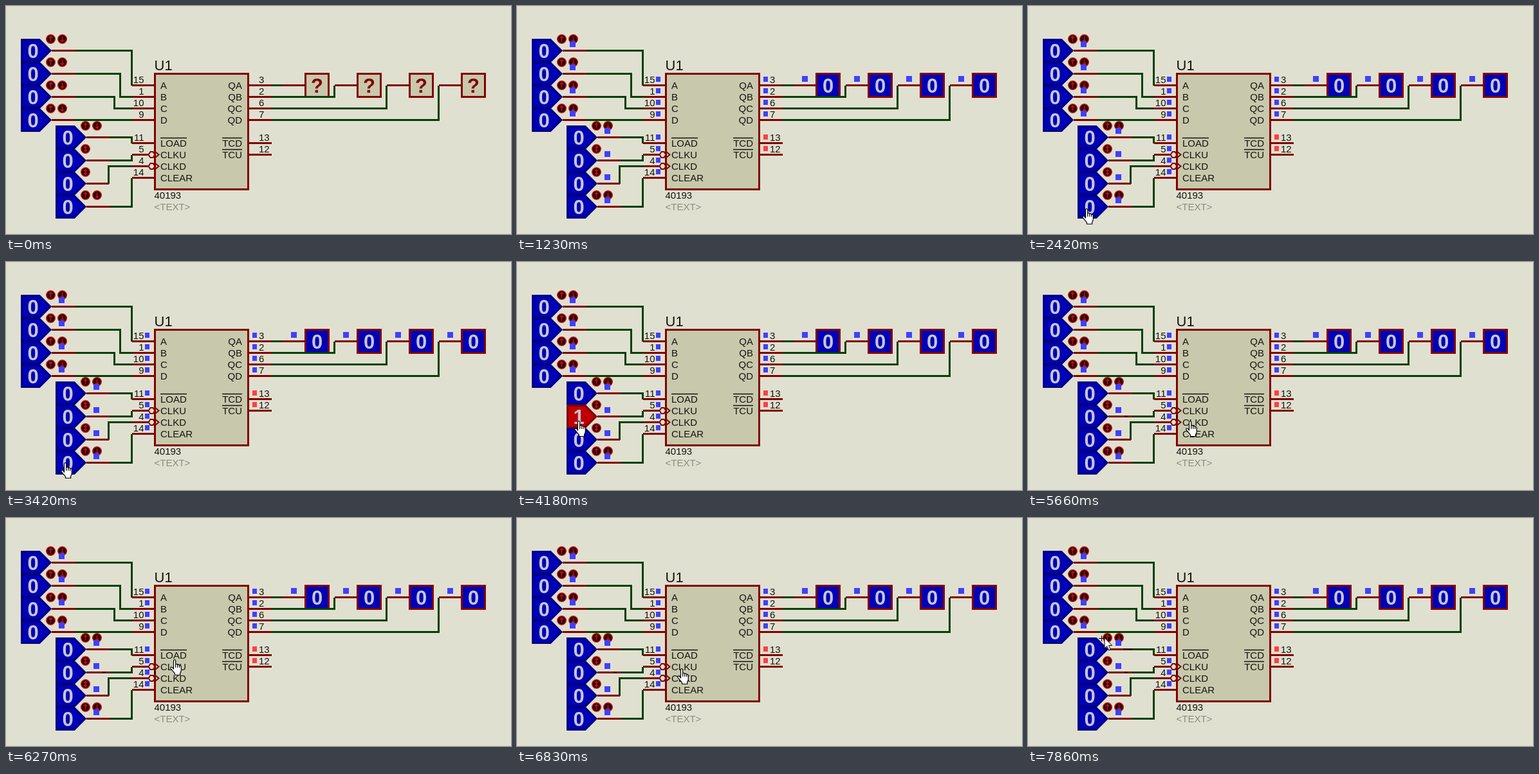
Write an HTML page that moves like this. It is 785 px wide and 355 px high and loops after 8000 ms.

```html
<!DOCTYPE html>
<html lang="en">
<head>
<meta charset="utf-8">
<title>Counter simulation</title>
<style>
  html, body { margin: 0; width: 100%; height: 100%; overflow: hidden; background: #e0e0d0; }
  svg { display: block; width: 785px; height: 355px; }
  text { font: 15px "Liberation Sans", Arial, sans-serif; fill: #141410; }
  .digit { font-size: 31px; font-weight: bold; text-anchor: middle; fill: #c6c6d0; }
  .unknown { fill: #800000; }
  .end { text-anchor: end; }
  .line { fill: none; stroke-width: 3; shape-rendering: crispEdges; }
  .wire { stroke: #004000; }
  .pin { stroke: #800000; }
</style>
</head>
<body>
<svg id="stage" viewBox="0 0 785 355">
  <g id="board"></g>
  <g id="cursor" visibility="hidden">
    <path id="hand" fill="#fff" stroke="#000" stroke-width="1.2" stroke-linejoin="round"
      d="M5.5 15V2.5Q5.5 .6 7 .6Q8.7 .6 8.7 2.5V8.5Q9 7.4 10.2 7.4Q11.6 7.4 11.8 9Q12.2 8.2 13.3 8.3Q14.6 8.4 14.7 10Q15.2 9.3 16.1 9.5Q17.3 9.8 17.3 11.5V17Q17.2 19.5 15.6 21.5V24.5H7.5V22.2L1.1 14.4Q.3 12.9 1.5 12.2Q2.6 11.6 3.8 12.9ZM8.7 8.5V13M11.8 9V13M14.7 10V13"/>
    <g id="arrow">
      <path stroke="#000" d="M0 4.5H8M4.5 0V9"/>
      <path fill="#fff" stroke="#000" d="M9 3.5V20L12.8 16.4L15.6 23L18.3 21.8L15.5 15.4H20.7Z"/>
    </g>
  </g>
</svg>
<script>
const LOOP = 8000, POWER_ON = 1230;
const LOW = "#4040ff", HIGH = "#ff4040";
const board = document.getElementById("board");

function add(tag, attrs, text) {
  const el = document.createElementNS("http://www.w3.org/2000/svg", tag);
  for (const key in attrs) el.setAttribute(key, attrs[key]);
  if (text) el.textContent = text;
  return board.appendChild(el);
}
const line = (kind, d) => add("path", { class: "line " + kind, d, transform: "translate(.5 .5)" });
const label = (x, y, text, cls = "") => add("text", { x, y, class: cls }, text);
const show = (el, on) => el.setAttribute("visibility", on ? "visible" : "hidden");

const lights = [];
function light(x, y, w, h, fill = LOW) {
  const el = add("rect", { x, y, width: w, height: h, fill });
  lights.push(el);
  return el;
}

function button(x, y, kind) {
  const head = { up: "M-2.5 -1.5L0 -4L2.5 -1.5", down: "M-2.5 1.5L0 4L2.5 1.5" };
  const heads = kind === "both" ? head.up + head.down : head[kind];
  const at = `translate(${x + .5} ${y + .5})`;
  add("circle", { r: 6.8, fill: "#300404", stroke: "#c81414", "stroke-width": 1.4, transform: at });
  add("path", { d: "M0 -4V4" + heads, fill: "none", stroke: "#c01818", "stroke-width": 1.3, transform: at });
}

// Chip body
add("rect", { x: 231.5, y: 105.5, width: 145, height: 180, fill: "#c8c8ac", stroke: "#800000", "stroke-width": 3 });
label(230.5, 100, "U1").style.fontSize = "22px";
label(230.5, 300, "40193");
label(230.5, 318, "<TEXT>").style.fill = "#8c8c82";

// name, pin number, tip x, tip y, chip pin y, bend x, kind of buttons
const INPUTS = [
  ["A", 15, 71, 69, 123, 195],
  ["B", 1, 71, 105, 141, 177],
  ["C", 10, 71, 141, 159, 168],
  ["D", 9, 71, 177, 177, 195],
  ["LOAD", 11, 125, 204, 213, 195],
  ["CLKU", 5, 125, 240, 231, 195, "both"],
  ["CLKD", 4, 125, 276, 249, 159, "both"],
  ["CLEAR", 14, 125, 312, 267, 195]
];
const inputs = {};
INPUTS.forEach(([name, number, x, y, py, bend, kind]) => {
  const joint = Math.min(x + 36, bend);
  line("wire", `M${joint} ${y}H${bend}V${py}H195`);
  line("pin", `M${x - 1} ${y}H${joint}`);
  const clock = kind === "both";
  line("pin", `M195 ${py}H${clock ? 221 : 231}`);
  if (clock) {
    add("path", {
      d: `M221 ${py}L224 ${py - 4.5}H228L231 ${py}L228 ${py + 4.5}H224ZM231 ${py - 5}L237 ${py}L231 ${py + 5}`,
      fill: "none", stroke: "#800000", "stroke-width": 2, transform: "translate(.5 .5)"
    });
  }
  const body = add("path", {
    d: `M${x - 46.5} ${y - 16.5}H${x - 19}L${x - 2} ${y + .5}L${x - 19} ${y + 17.5}H${x - 46.5}Z`,
    "stroke-width": 3
  });
  const digit = label(x - 29, y + 11.5, "0", "digit");
  if (clock) button(x - 2, y - 18, "both");
  else {
    button(x - 2, y - 18, "up");
    button(x + 16, y - 18, "down");
  }
  label(240, py + 6, name);
  label(214.5, py - 3, String(number), "end");
  inputs[name] = {
    body, digit,
    lights: [light(x + 11, y - 14, 9, 9), light(216, py - 13, 7, 8)]
  };
});

// name, pin number, pin y, bend x
const probes = [];
[["QA", 3, 123, 428], ["QB", 2, 141, 510], ["QC", 6, 159, 591], ["QD", 7, 177, 672]]
  .forEach(([name, number, y, bend], i) => {
    const left = 465 + 81 * i;
    line("wire", `M412 ${y}H${bend}V123`);
    line("pin", `M376 ${y}H412M${bend} 123H${left}`);
    const box = add("rect", { x: left + .5, y: 105.5, width: 36, height: 36, stroke: "#800000", "stroke-width": 3 });
    probes.push({ box, digit: label(left + 18.5, 134.5, "?", "digit") });
    label(367, y + 6, name, "end");
    label(393, y - 3, String(number));
    light(383, y - 13, 7, 8);
    light(443 + 81 * i, 109, 9, 9);
  });
[["TCD", 13, 213], ["TCU", 12, 231]].forEach(([name, number, y]) => {
  line("pin", `M376 ${y}H412`);
  label(367, y + 6, name, "end");
  label(393, y - 3, String(number));
  light(383, y - 13, 7, 8, HIGH);
});
add("path", {
  d: "M240 205.5H281M336 205.5H367M336 223.5H367", stroke: "#141410", "stroke-width": 1.5
});

// Dark traces left behind by the pointer
const traces = [[5430, "M150 240.5H155"], [5658, "M231.5 238V244"], [7860, "M148 204.5H162"]]
  .map(([from, d]) => ({ from, el: add("path", { d, stroke: "#180808", "stroke-width": 2 }) }));

const PULSES = [["CLEAR", 2570, 2950], ["CLKU", 4180, 4420]];
const LAG = 80;

// start, end, steps, x, y: each move goes on from the previous place
const MOVES = [
  [1700, 2100, 6, 89, 323],
  [2250, 2420, 3, 84, 315],
  [2570, 2720, 3, 84, 313],
  [3420, 3420, 1, 85, 312],
  [3490, 3720, 4, 89, 247],
  [4490, 4650, 3, 91, 271],
  [5050, 5354, 5, 165, 206],
  [5430, 5658, 4, 245, 247],
  [5734, 5810, 2, 255, 243],
  [5890, 6040, 3, 255, 229],
  [6270, 6360, 2, 255, 211],
  [6590, 6680, 2, 248, 253],
  [6830, 6830, 1, 249, 234],
  [6920, 6920, 1, 246, 211],
  [7070, 7230, 3, 247, 251],
  [7310, 7860, 8, 110, 183]
];

function place(t) {
  let x = 89, y = 355;
  for (const [start, end, steps, toX, toY] of MOVES) {
    if (t < start) break;
    const gap = (end - start) / (steps - 1) || 1;
    const part = Math.min(steps, Math.floor((t - start) / gap + 1e-6) + 1) / steps;
    x += (toX - x) * part;
    y += (toY - y) * part;
  }
  return [Math.round(x), Math.round(y)];
}

const cursor = document.getElementById("cursor");
const hand = document.getElementById("hand");
const arrow = document.getElementById("arrow");

function draw(t) {
  const on = t >= POWER_ON;
  lights.forEach(el => show(el, on));
  probes.forEach(({ box, digit }) => {
    box.setAttribute("fill", on ? "#0000b8" : "#c8c8ac");
    digit.textContent = on ? "0" : "?";
    digit.classList.toggle("unknown", !on);
  });

  for (const name in inputs) {
    const high = at => PULSES.some(([who, from, to]) => who === name && at >= from && at < to);
    const { body, digit, lights: own } = inputs[name];
    const set = high(t);
    body.setAttribute("fill", set ? "#c00000" : "#0000b8");
    body.setAttribute("stroke", set ? "#800000" : "#000080");
    digit.textContent = set ? "1" : "0";
    own.forEach(el => el.setAttribute("fill", high(t - LAG) ? HIGH : LOW));
  }
  traces.forEach(({ from, el }) => show(el, t >= from));

  const [x, y] = place(t);
  const pointing = t > 5050 && (x > 108 && x < 222);
  show(cursor, t >= MOVES[0][0]);
  cursor.setAttribute("transform", `translate(${x} ${y})`);
  hand.style.display = pointing ? "none" : "";
  arrow.style.display = pointing ? "" : "none";
}

const began = performance.now();
function tick() {
  draw((performance.now() - began) % LOOP);
  requestAnimationFrame(tick);
}
tick();
</script>
</body>
</html>
```
